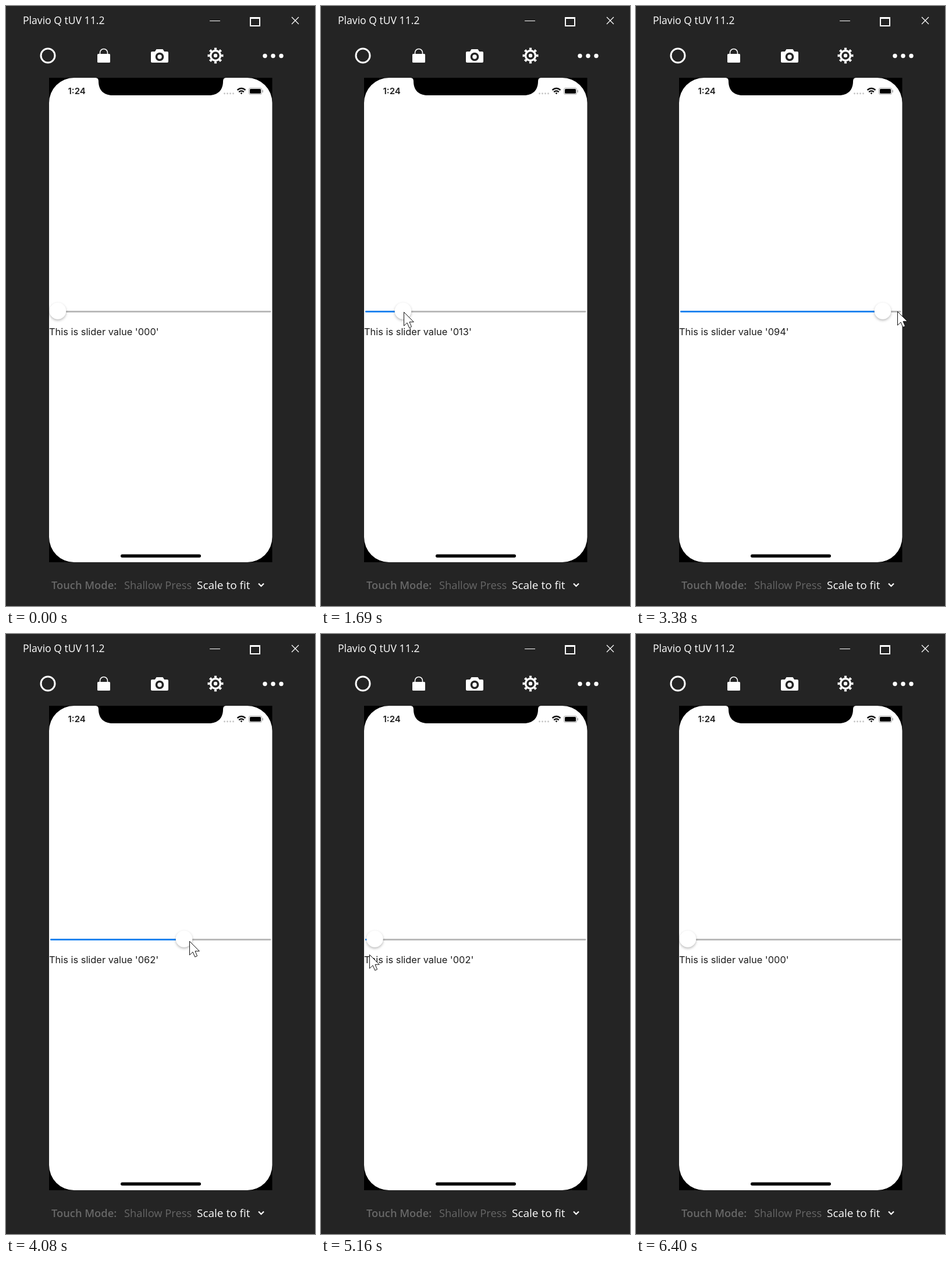
These frames come from a looping animation (531 px wide and 1028 px high, 7100 ms). An HTML page:

```html
<!DOCTYPE html>
<html lang="en">
<head>
<meta charset="utf-8">
<title>Slider demo</title>
<style>
  html, body { margin: 0; width: 100%; height: 100%; overflow: hidden; background: #242424; }
  svg { display: block; }
  .ui { font-family: "Open Sans", "Noto Sans", sans-serif; fill: #fff; }
  .app { font-family: Inter, Roboto, sans-serif; fill: #1c1c1c; }
  .line { fill: none; stroke: #fff; }
  #knob { filter: drop-shadow(0 2px 2px rgba(0, 0, 0, .28)); }
</style>
</head>
<body>
<svg width="531" height="1028" viewBox="0 0 531 1028">
  <!-- window bar -->
  <g class="ui">
    <text x="29" y="31" font-size="17.6">Plavio Q tUV 11.2</text>
    <rect x="350" y="25" width="18" height="1"/>
    <path class="line" stroke-width="2" d="M420 20.5H436V34H420Z"/>
    <rect x="419" y="19" width="18" height="3"/>
    <path class="line" stroke-width="1.3" d="M491 19L503 31M503 19L491 31"/>
  </g>

  <!-- toolbar -->
  <g fill="#fff">
    <circle class="line" cx="72" cy="85" r="12" stroke-width="3"/>
    <rect x="157" y="82" width="22" height="15" rx="1.5"/>
    <path class="line" stroke-width="1.6" d="M161.5 83V80a6.5 6.5 0 0 1 13 0V83"/>
    <path d="M251 78H256L258.500 74H269.500L272 78H277a2 2 0 0 1 2 2V95a2 2 0 0 1 -2 2H251a2 2 0 0 1 -2 -2V80a2 2 0 0 1 2 -2Z"/>
    <circle cx="264" cy="87" r="5.500" stroke="#242424" stroke-width="3.600"/>
    <circle class="line" cx="360" cy="85" r="8.500" stroke-width="3.400"/>
    <circle class="line" cx="360" cy="85" r="11.500" stroke-width="4" pathLength="16" stroke-dasharray="0.900 1.100" stroke-dashoffset="0.450"/>
    <circle cx="360" cy="85" r="3.200"/>
    <circle cx="445" cy="85.500" r="3.700"/>
    <circle cx="459" cy="85.500" r="3.700"/>
    <circle cx="473" cy="85.500" r="3.700"/>
  </g>

  <!-- phone -->
  <rect x="74" y="123" width="383.500" height="830"/>
  <rect x="74" y="123" width="383.500" height="830" rx="43" fill="#fff"/>
  <path d="M154 123q5 0 5 6c0 15 9 24 24 24H349c15 0 24 -9 24 -24q0 -6 5 -6Z"/>
  <text class="app" x="106.500" y="151" font-size="15" font-weight="600">1:24</text>
  <g fill="#c4c4c4">
    <circle cx="375.500" cy="150" r="1.400"/>
    <circle cx="380.500" cy="150" r="1.400"/>
    <circle cx="385.500" cy="150" r="1.400"/>
    <circle cx="390.500" cy="150" r="1.400"/>
  </g>
  <g fill="none" stroke="#111" stroke-width="2.400">
    <path d="M397.500 144q7 -6 14 0M400.200 147.300q4.300 -3.600 8.600 0"/>
    <path d="M402.600 149L404.500 151.500L406.400 149Q404.500 147.600 402.600 149Z" fill="#111" stroke="none"/>
  </g>
  <rect x="417.500" y="140.500" width="22" height="11" rx="2.500" fill="none" stroke="#aaa"/>
  <rect x="419" y="142" width="19" height="8" rx="1.500"/>
  <rect x="440.500" y="144" width="1.500" height="4" fill="#aaa"/>
  <rect x="197" y="939.500" width="138" height="5.500" rx="2.700"/>

  <!-- slider -->
  <rect x="76" y="522.300" width="379.500" height="2.600" rx="1.300" fill="#b5b5b5"/>
  <rect id="fill" x="76" y="522.300" height="2.600" rx="1.300" fill="#1080f2"/>
  <circle id="knob" cy="522.500" r="14.300" fill="#fff"/>
  <text id="label" class="app" x="74" y="564" font-size="16.400"></text>

  <!-- footer -->
  <g class="ui">
    <text x="78" y="999" font-size="18.300" font-weight="600" style="fill:#676767">Touch Mode:</text>
    <text x="203" y="999" font-size="18.300" style="fill:#676767">Shallow Press</text>
    <text x="328" y="999" font-size="19">Scale to fit</text>
    <path class="line" stroke-width="2.200" d="M434 989.500L438.500 994L443 989.500"/>
  </g>

  <path id="cursor" d="M.5 .5V24L6 18.800L9.700 27.300L13.600 25.600L10 17.300H17.300Z" fill="#fff" stroke="#111"/>
</svg>
<script>
const LOOP = 7100, START = 300, STEP = 77.1, END = 6395;
const MIN = 89, UNIT = 3.53;
const linear = u => u;
const easeOut = u => 1 - (1 - u) ** 1.6;
const easeIn = u => u ** 1.4;

// time, pointer x, pointer y, knob x, easing towards the next key
const keys = [
  [300, 333, 860, 89, easeOut],
  [990, 99, 519, 89],
  [1065, 97, 518, 89],
  [1480, 97, 518, 89],
  [1688, 142, 524, 141],
  [2235, 245, 530, 236],
  [2690, 332, 532, 316],
  [3000, 379, 528, 359],
  [3384, 449, 523, 424],
  [3480, 453, 523, 429],
  [3600, 448, 523, 427],
  [3780, 380, 524, 365],
  [4078, 315, 526, 306],
  [4540, 242, 536, 238],
  [5157, 83, 549, 92.5],
  [5300, 62, 553, 89],
  [5470, 61, 553, 89],
  [5620, 61, 553, 89, easeIn],
  [6330, 475, 1015, 89],
  [6400, 530, 1080, 89]
];

function pose(t) {
  const next = keys.findIndex(k => k[0] > t);
  if (next < 1) return keys[next ? keys.length - 1 : 0].slice(1, 4);
  const a = keys[next - 1], b = keys[next];
  const u = (a[4] || linear)((t - a[0]) / (b[0] - a[0]));
  return [1, 2, 3].map(i => a[i] + (b[i] - a[i]) * u);
}

const [fill, knob, label, cursor] =
  ["fill", "knob", "label", "cursor"].map(id => document.getElementById(id));

function draw(now) {
  const t = now % LOOP;
  const shown = START + Math.floor((t - START + 8) / STEP) * STEP;
  const [x, y, k] = pose(shown);
  const value = Math.round((pose(shown - 18)[2] - MIN) / UNIT);
  fill.setAttribute("width", k > MIN ? k - 76 : 0);
  knob.setAttribute("cx", k);
  label.textContent = `This is slider value '${String(value).padStart(3, "0")}'`;
  cursor.setAttribute("transform", `translate(${Math.round(x)} ${Math.round(y)})`);
  cursor.style.display = t >= START && t < END ? "" : "none";
}

let origin;
function tick(now) {
  origin ??= now;
  draw(now - origin);
  requestAnimationFrame(tick);
}
draw(0);
requestAnimationFrame(tick);
</script>
</body>
</html>
```
